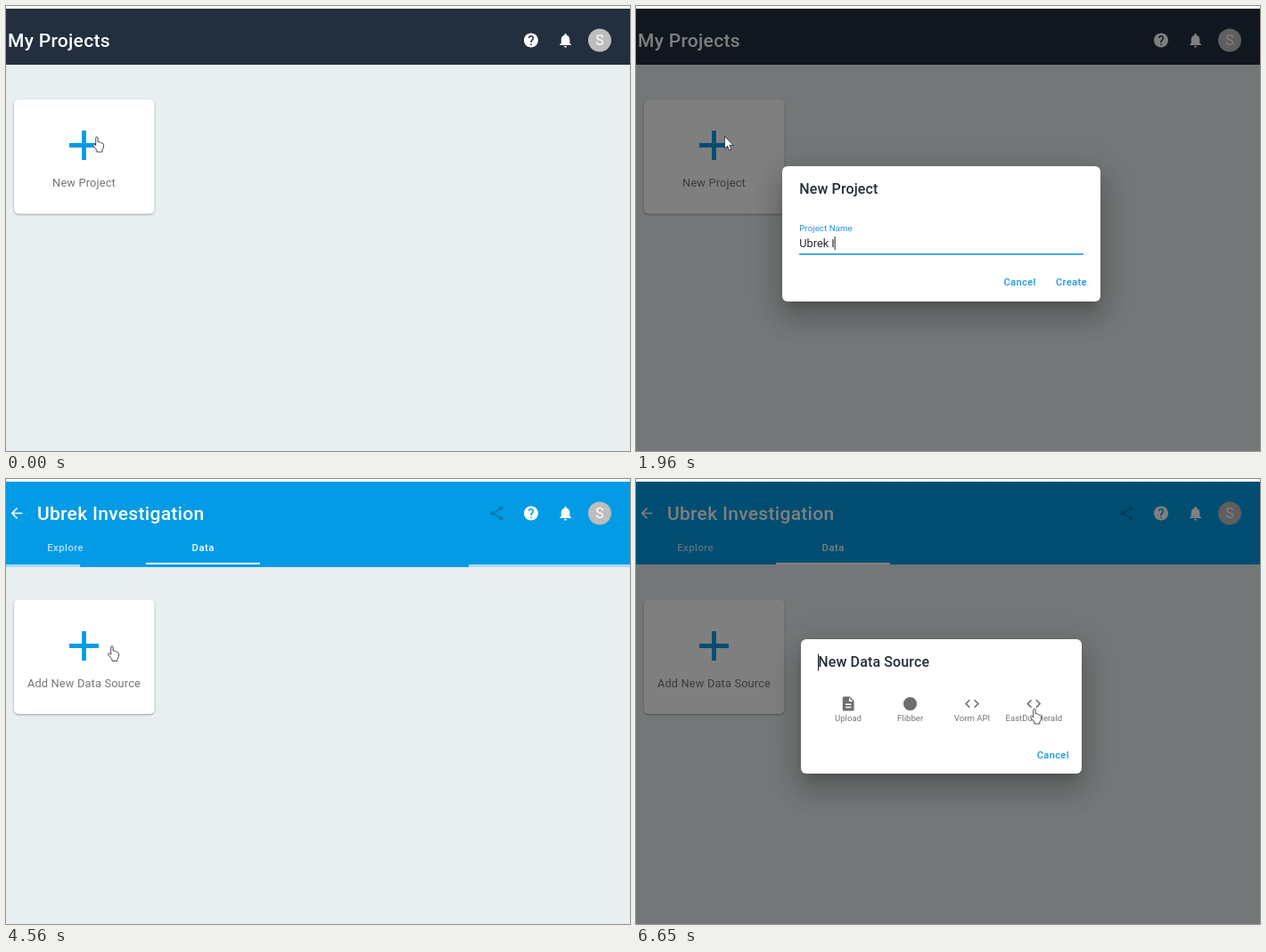
Animation, 700 px wide and 500 px high, one loop 6.78 s. Source, as an HTML page:

```html
<!DOCTYPE html>
<html lang="en">
<head>
<meta charset="utf-8">
<title>New project walkthrough</title>
<style>
html, body { margin: 0; width: 100%; height: 100%; overflow: hidden; background: #fff; }
svg, .layer { position: absolute; left: 0; top: 0; width: 700px; height: 500px; }
text { font-family: Roboto, sans-serif; white-space: pre; }
.layer { background: linear-gradient(#0000 3px, #00000080 0); }
.box {
  position: absolute; border-radius: 6px; background: #fff;
  box-shadow: 0 9px 12px -6px #0003, 0 19px 30px 2px #00000024, 0 7px 37px 6px #0000001f;
}
.card { fill: #fff; filter: drop-shadow(0 1px 1px #0005); }
.head { font-size: 21px; font-weight: 500; letter-spacing: .3px; fill: #fff; }
.tab { font-size: 11.2px; font-weight: 500; letter-spacing: .5px; fill: #fff; text-anchor: middle; }
.hint { font-size: 12.8px; letter-spacing: .16px; fill: #757575; text-anchor: middle; }
.title { font-size: 16px; font-weight: 500; letter-spacing: .12px; fill: #232f3e; }
.action { font-size: 11.2px; font-weight: 500; letter-spacing: .3px; fill: #1a98e4; }
.tile { font-size: 9.6px; text-anchor: middle; fill: #757575; }
.plus { stroke: #039be5; stroke-width: 4.8; }
#track { position: absolute; top: 96px; width: 700px; height: 3px; overflow: hidden; background: #aadaf4; }
#track div { position: absolute; width: 100%; height: 100%; }
#track div div { background: #039be5; }
</style>
</head>
<body>
<svg viewBox="0 0 700 500">
  <defs>
    <path id="help" d="M12 2C6.48 2 2 6.48 2 12s4.48 10 10 10 10-4.48 10-10S17.52 2 12 2zm1 17h-2v-2h2v2zm2.07-7.75l-.9.92C13.45 12.9 13 13.5 13 15h-2v-.5c0-1.1.45-2.1 1.17-2.83l1.24-1.26c.37-.36.59-.86.59-1.41 0-1.1-.9-2-2-2s-2 .9-2 2H8c0-2.21 1.79-4 4-4s4 1.79 4 4c0 .88-.36 1.68-.93 2.25z"/>
    <path id="doc" d="M14 2H6c-1.1 0-2 .9-2 2v16c0 1.1.9 2 2 2h12c1.1 0 2-.9 2-2V8l-6-6zm2 16H8v-2h8v2zm0-4H8v-2h8v2zm-3-5V3.5L18.5 9H13z"/>
    <path id="code" d="M9.4 16.6L4.8 12l4.6-4.6L8 6l-6 6 6 6 1.4-1.4zm5.2 0l4.6-4.6-4.6-4.6L16 6l6 6-6 6-1.4-1.4z"/>
  </defs>
  <rect y="3" width="700" height="497" fill="#e9eef1"/>

  <g id="home">
    <rect y="3" width="700" height="63" fill="#232f3e"/>
    <text class="head" x="2" y="46">My Projects</text>
    <rect class="card" x="9" y="105" width="157.5" height="128.5" rx="5"/>
    <path class="plus" d="M71 156.5h33M87.5 140v33"/>
    <text class="hint" x="87.5" y="203">New Project</text>
  </g>

  <g id="data">
    <rect y="3" width="700" height="93" fill="#039be5"/>
    <path transform="translate(2.4 28.9) scale(.8)" fill="#fff" d="M20 11H7.83l5.59-5.59L12 4l-8 8 8 8 1.41-1.41L7.83 13H20v-2z"/>
    <text class="head" x="35" y="46">Ubrek Investigation</text>
    <g transform="translate(540.9 28.9) scale(.8)" fill="#0277b0">
      <path d="M18 5L6 12l12 7" fill="none" stroke="#0277b0" stroke-width="2"/>
      <circle cx="18" cy="5" r="3"/><circle cx="6" cy="12" r="3"/><circle cx="18" cy="19" r="3"/>
    </g>
    <text class="tab" x="66.7" y="81.3" opacity=".7">Explore</text>
    <text class="tab" x="221.2" y="81.3">Data</text>
    <rect x="157" y="94" width="128" height="2.4" fill="#fff"/>
    <rect class="card" x="9" y="135.5" width="157.5" height="128.5" rx="5"/>
    <path class="plus" d="M71 187.5h33M87.5 171v33"/>
    <text class="hint" x="87.5" y="234">Add New Data Source</text>
  </g>

  <use href="#help" transform="translate(579.4 28.9) scale(.8)" fill="#fff"/>
  <path transform="translate(618 28.9) scale(.8)" fill="#fff" d="M12 22c1.1 0 2-.9 2-2h-4c0 1.1.89 2 2 2zm6-6v-5c0-3.07-1.64-5.64-4.5-6.32V4c0-.83-.67-1.5-1.5-1.5s-1.5.67-1.5 1.5v.68C7.63 5.36 6 7.92 6 11v5l-2 2v1h16v-1l-2-2z"/>
  <circle cx="666" cy="38.5" r="13" fill="#bdbdbd"/>
  <text x="666" y="44.3" font-size="16" fill="#fff" text-anchor="middle">S</text>
</svg>

<div id="track"><div><div></div></div><div><div></div></div></div>

<div class="layer" id="projectDialog">
  <div class="box" style="left:164px;top:179.5px;width:357px;height:152.5px"></div>
  <svg viewBox="0 0 700 500">
    <text class="title" x="183.3" y="210.5">New Project</text>
    <text id="label" x="183.2" y="253.3" font-size="9.6" letter-spacing=".12">Project Name</text>
    <text id="input" x="183.2" y="271" font-size="12.8" fill="#2b2b2b"></text>
    <rect id="inputCaret" y="259" width="1" height="15" fill="#222"/>
    <rect id="line" y="278" height="1.6" fill="#1a98e4"/>
    <text class="action" x="412.5" y="314.3">Cancel</text>
    <text class="action" x="471" y="314.3">Create</text>
  </svg>
</div>

<div class="layer" id="sourceDialog">
  <div class="box" style="left:185px;top:180px;width:315px;height:151px"></div>
  <svg viewBox="0 0 700 500">
    <text class="title" x="204.3" y="211.2">New Data Source</text>
    <rect id="titleCaret" x="204" y="196.5" width="1" height="19" fill="#222"/>
    <g fill="#6e6e6e">
      <use href="#doc" transform="translate(228.6 242.9) scale(.8)"/>
      <circle cx="307.5" cy="252.6" r="7.5"/>
      <use href="#code" transform="translate(367.4 242.9) scale(.8)"/>
      <use href="#code" transform="translate(436.6 242.9) scale(.8)"/>
    </g>
    <text class="tile" x="238" y="272.3">Upload</text>
    <text class="tile" x="307.6" y="272.3">Flibber</text>
    <text class="tile" x="377" y="272.3">Vorm API</text>
    <text class="tile" x="446.3" y="272.3">EastDunHerald</text>
    <text class="action" x="449.7" y="314.3">Cancel</text>
  </svg>
</div>

<svg viewBox="0 0 700 500">
  <g id="cursor" fill="#fff" stroke="#1c2430" stroke-linejoin="round">
    <path id="hand" transform="translate(-2.8 .3) scale(.8)" d="M5 1.7C5 0 8 0 8 1.7V7.2l1-.2c1.2 0 1.8.6 2 1.2 1.4-.3 2.2.3 2.4 1.2 1.8-.4 2.6.5 2.6 1.9V15l-2 4v2.5H6.5V19L1.4 12.8C.3 11.2 2 9.8 3.4 10.8L5 12.5Z"/>
    <path id="arrow" stroke-width=".8" d="M0 0V13.6L3.1 10.8 5.2 15.6 7.4 14.6 5.3 9.9H9.6Z"/>
  </g>
</svg>

<script>
const LOOP = 6780;
const $ = id => document.getElementById(id);
const clamp = v => Math.min(1, Math.max(0, v));
const show = (id, on) => $(id).style.display = on ? '' : 'none';

const NAME = 'Ubrek Investigation';
// [time, characters typed]
const typing = [[1490, 1], [1600, 2], [1720, 4], [1890, 5], [1960, 7], [2130, 8], [2215, 9], [2300, 10],
  [2470, 11], [2530, 12], [2700, 13], [2780, 14], [2860, 15], [2945, 17], [3030, 18], [3110, 19]];
// [time, x, y] of the pointer
const route = [[0, 99.5, 146.5], [4250, 99.5, 146.5], [4500, 116.5, 187], [4660, 116.5, 187], [4790, 113, 188],
  [5440, 113, 188], [5840, 436, 257], [6010, 436, 257], [6250, 444.5, 257.5], [LOOP, 444.5, 257.5]];

function pointer(t) {
  const i = route.findIndex(k => k[0] > t);
  const [a, x0, y0] = route[i - 1], [b, x1, y1] = route[i];
  const u = (t - a) / (b - a), e = u * u * (3 - 2 * u);
  return [x0 + (x1 - x0) * e, y0 + (y1 - y0) * e];
}

// Indeterminate progress: each bar slides while its fill changes width.
const bez = (...p) => `cubic-bezier(${p})`;
const slide = (v, offset, easing = 'linear') => ({ transform: `translateX(${v}%)`, offset, easing });
const scale = (v, offset, easing = 'linear') => ({ transform: `scaleX(${v})`, offset, easing });
const [bar1, bar2] = $('track').children;
bar1.style.left = '-145.17%';
bar2.style.left = '-54.89%';
const progress = [
  [bar1, [slide(0, 0), slide(0, .2, bez(.5, 0, .702, .496)), slide(83.67, .5915, bez(.302, .381, .55, .956)), slide(200.61, 1)]],
  [bar1.firstChild, [scale(.08, 0), scale(.08, .3665, bez(.335, .125, .786, 1)), scale(.661, .6915, bez(.06, .11, .6, 1)), scale(.08, 1)]],
  [bar2, [slide(0, 0, bez(.15, 0, .515, .41)), slide(37.65, .25, bez(.31, .284, .8, .734)), slide(84.39, .4835, bez(.4, .627, .6, .902)), slide(160.28, 1)]],
  [bar2.firstChild, [scale(.08, 0, bez(.205, .057, .577, .454)), scale(.457, .1915, bez(.152, .196, .648, 1.004)), scale(.728, .4415, bez(.258, -.003, .212, 1.382)), scale(.08, 1)]]
].map(([el, keys]) => {
  const a = el.animate(keys, { duration: 2714, fill: 'both' });
  a.pause();
  return a;
});

function draw(t) {
  const onData = t >= 4060;
  show('home', !onData);
  show('data', onData);
  show('track', onData && t < 5840);
  progress.forEach(a => a.currentTime = Math.max(0, t - 3732));

  const opening = clamp((t - 850) / 190);
  $('projectDialog').style.opacity = Math.min(opening, clamp((3385 - t) / 135));
  $('sourceDialog').style.opacity = clamp((t - 5010) / 190);

  const typed = typing.reduce((n, [at, count]) => t >= at ? count : n, 0);
  const input = $('input');
  input.textContent = NAME.slice(0, typed);
  $('inputCaret').setAttribute('x', 183 + (typed ? input.getComputedTextLength() : 0));
  show('inputCaret', t < 3110 || t >= 3280);
  $('label').setAttribute('fill', t < 1090 ? '#808080' : '#1a98e4');
  const width = 319 * (1 - .5 * (1 - opening) ** 2);
  $('line').setAttribute('x', 342.5 - width / 2);
  $('line').setAttribute('width', width);
  show('titleCaret', Math.floor((t - 6650) / 490) % 2 === 0);

  const isHand = t < 860 || (t >= 3330 && t < 5010) || t >= 5640;
  show('hand', isHand);
  show('arrow', !isHand);
  $('cursor').setAttribute('transform', `translate(${pointer(t)})`);
}

const start = performance.now();
function tick() {
  draw((performance.now() - start) % LOOP);
  requestAnimationFrame(tick);
}
tick();
</script>
</body>
</html>
```
